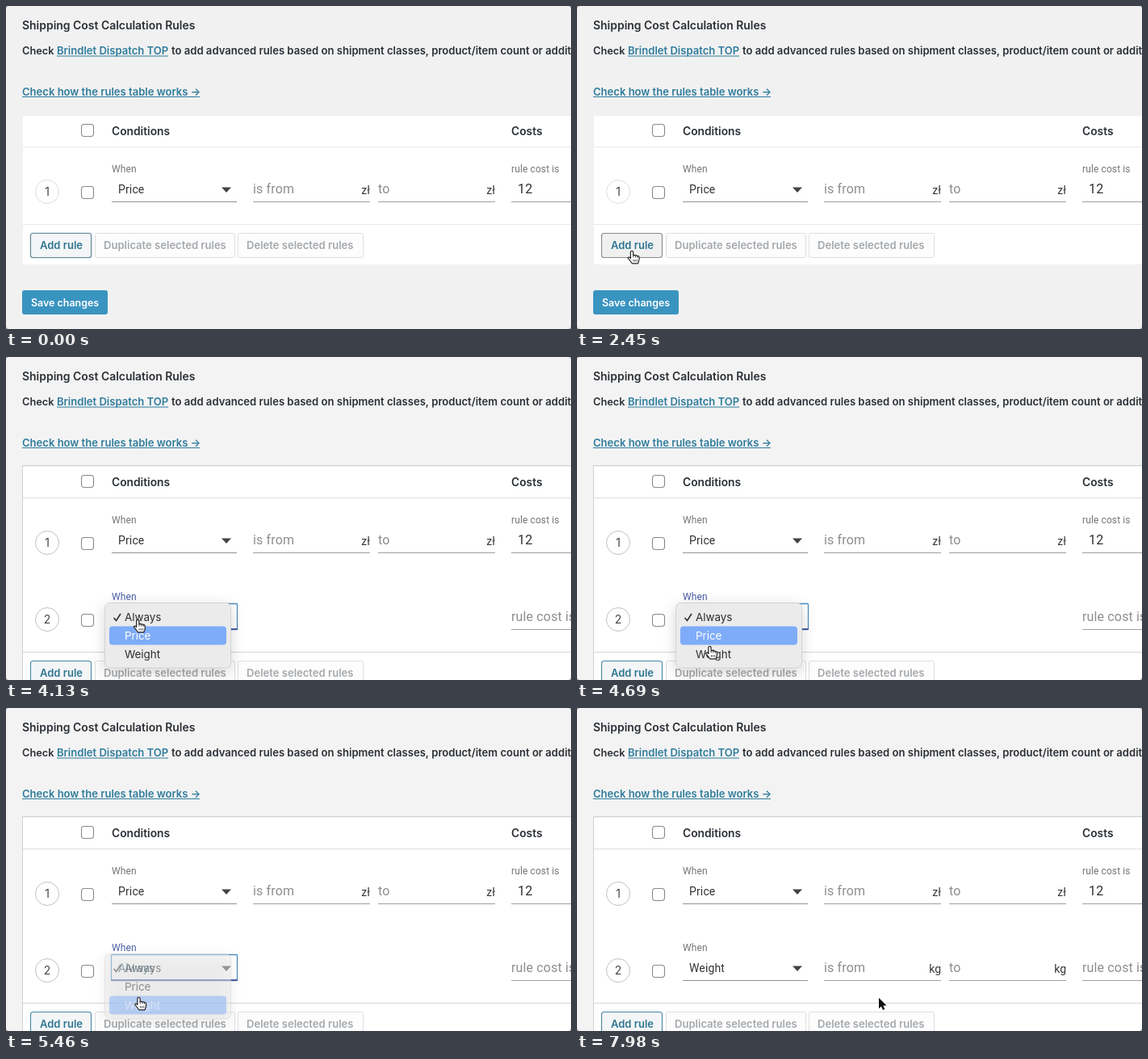
An HTML page with a canvas for the animation above (8 s loop, 700x400 px).

```html
<!DOCTYPE html>
<html lang="en">
<head>
<meta charset="utf-8">
<title>Shipping rules</title>
<style>
  html, body { margin: 0; width: 100%; height: 100%; overflow: hidden; background: #f2f2f2; }
  canvas { display: block; width: 700px; height: 400px; }
</style>
</head>
<body>
<canvas id="stage" width="700" height="400"></canvas>
<script>
const ctx = document.getElementById('stage').getContext('2d');
const LOOP = 8000;
const UI = 'Inter, "Liberation Sans", sans-serif';
const FIELD = 'Roboto, "Liberation Sans", sans-serif';
const INK = '#2b3036', LINK = '#2f7c9c', MUTED = '#a4a8ac', INDIGO = '#4a5ea6';

// Event times in ms
const T = {
  enter: 1050, hover: 1860, added: 2520, over: 3290, open: 3640,
  price: 4130, weight: 4760, fade: 5360, closed: 5560, blur: 7000
};
// Spans in which the mouse button is held
const CLICKS = [[2240, 2400], [3500, 3640], [5040, 5180], [6860, 7000]];
// Cursor moves: start, end, x, y
const MOVES = [
  [980, 1820, 68, 303], [3040, 3480, 163, 320], [3880, 4660, 164.5, 358],
  [6040, 6640, 262, 357], [7500, 7980, 374, 359]
];

const ease = p => p < 0.5 ? 4 * p ** 3 : 1 - (2 - 2 * p) ** 3 / 2;
const clamp = p => Math.max(0, Math.min(1, p));
const within = (t, a, b) => t >= a && t < b;

function text(str, x, y, font, color, { align = 'left', gap = 0 } = {}) {
  ctx.font = font;
  ctx.fillStyle = color;
  ctx.textAlign = align;
  ctx.letterSpacing = gap + 'px';
  ctx.fillText(str, x, y);
  ctx.letterSpacing = '0px';
}
const bold = (str, x, y, size, color = INK) => text(str, x, y, `600 ${size}px ${UI}`, color);
const field = (str, x, y, size, color) =>
  text(str, x, y, `${size}px ${FIELD}`, color, { gap: size * 0.0094 });
const unit = (str, x, y) => text(str, x, y, `14px ${FIELD}`, '#383838', { align: 'right' });

function rect(x, y, w, h, color) {
  ctx.fillStyle = color;
  ctx.fillRect(x, y, w, h);
}

function box(x, y, w, h, r, fill, stroke, line = 1) {
  ctx.beginPath();
  ctx.roundRect(x, y, w, h, r);
  if (fill) { ctx.fillStyle = fill; ctx.fill(); }
  if (stroke) { ctx.strokeStyle = stroke; ctx.lineWidth = line; ctx.stroke(); }
}

function circle(x, y, r, color, line) {
  ctx.beginPath();
  ctx.arc(x, y, r, 0, 7);
  ctx.strokeStyle = color;
  ctx.lineWidth = line;
  ctx.stroke();
}

function link(str, x, y, width) {
  bold(str, x, y, 13.05, LINK);
  rect(x, y + 1.5, width, 1, LINK);
}

const checkbox = (x, y) => box(x - 7.5, y - 7.5, 15, 15, 3.5, '#fff', '#85898e', 1.1);

function arrowDown(x, y) {
  ctx.beginPath();
  ctx.moveTo(x - 6, y);
  ctx.lineTo(x + 6, y);
  ctx.lineTo(x, y + 6.5);
  ctx.fillStyle = '#444';
  ctx.fill();
}

function header() {
  bold('Shipping Cost Calculation Rules', 20, 28.5, 13.95);
  bold('Check', 20, 60, 12.8);
  link('Brindlet Dispatch TOP', 63, 60, 138);
  bold('to add advanced rules based on shipment classes, product/item count or addit', 205, 60, 13.08);
  link('Check how the rules table works →', 20, 110.5, 220);
}

function table(added) {
  const foot = added ? 365 : 270, bottom = added ? 420 : 320;
  rect(21, 136, 680, bottom - 136, '#fff');
  if (added) {
    rect(20, 134, 680, 1, '#d0d2d4');
    rect(20, 134, 1, 266, '#d0d2d4');
  }
  rect(21, 174, 680, 1, added ? '#dedede' : '#ebebeb');
  rect(21, foot, 680, 1, added ? '#d6d6d6' : '#e8e8e8');
  checkbox(101, 154);
  bold('Conditions', 131, 160, 13.8);
  bold('Costs', 626, 160, 13.8);
}

function range(y, suffix) {
  for (const [x, label] of [[306, 'is from'], [461, 'to']]) {
    field(label, x, y + 5, 16, '#8d8d8d');
    unit(suffix, x + 145, y + 5.5);
    rect(x, y + 15, 145, 1, '#a0a0a0');
  }
}

function rowStart(n, y, ring) {
  circle(51, y + 3, 14.5, ring, 1);
  text(n, 51, y + 8, `14px ${UI}`, '#444', { align: 'center' });
  checkbox(101, y + 4);
}

function select(value, y, state = 'idle') {
  const focus = state === 'focus', over = state === 'over';
  field('When', 131, y - 21, 12, focus ? INDIGO : '#757575');
  if (focus) {
    box(130.5, y - 16.5, 156, 32, 1, '#fff', '#4b8fc4', 1.3);
    rect(130, y + 14, 157, 2, INDIGO);
  } else if (over) {
    rect(131, y + 14, 155, 2, '#222');
  } else {
    rect(131, y + 15, 155, 1, '#929292');
  }
  field(value, 139, y + 5, 14, focus ? '#36667c' : over ? '#3a8fc0' : '#333');
  arrowDown(273, y - 2.5);
}

function firstRow(added) {
  rowStart('1', 227, added ? '#bfc1c3' : '#dddddd');
  select('Price', 227);
  range(227, 'zł');
  field('rule cost is', 626, 206, 12, '#757575');
  field('12', 634, 232, 16, '#303030');
  rect(626, 242, 80, 1, '#a0a0a0');
}

function secondRow(t) {
  const state = within(t, T.over, T.open) ? 'over' : within(t, T.open, T.blur) ? 'focus' : 'idle';
  rowStart('2', 322, '#bfc1c3');
  select(t < T.closed ? 'Always' : 'Weight', 322, state);
  if (t >= T.closed) range(322, 'kg');
  field('rule cost is', 626, 327, 16, '#8d8d8d');
  rect(626, 337, 80, 1, '#a0a0a0');
}

function buttons(t, added) {
  const y = added ? 376 : 281;
  const hover = within(t, T.hover, T.added), ring = added && t < T.open;
  const edge = hover ? '#858b90' : added ? '#4388a8' : '#64879a';
  if (!added && !hover) box(29, y - 1, 79, 33, 4, '#e9eef1');
  box(30.5, y + 0.5, 75, 30, 3, hover ? '#f0f0f1' : '#f3f5f6', edge, ring ? 2 : 1.1);
  bold('Add rule', 42, y + 20, 13, '#2f7590');
  for (const [x, w, label] of [
    [110.5, 173, 'Duplicate selected rules'],
    [287.5, 155, 'Delete selected rules']
  ]) {
    box(x, y + 0.5, w, 30, 2, '#fdfdfd', '#dcdee0');
    bold(label, x + 10.5, y + 20, 13.05, MUTED);
  }
  if (!added) {
    box(20, 352, 106, 30, 3, '#3994c0');
    bold('Save changes', 31, 371.5, 12.45, '#fff');
  }
}

function popup(t) {
  if (!within(t, T.open, T.closed + 120)) return;
  const active = t < T.price ? 0 : t < T.weight ? 1 : 2;
  ctx.save();
  ctx.globalAlpha = 1 - clamp((t - T.fade) / 200);
  ctx.save();
  ctx.shadowColor = 'rgba(0,0,0,.17)';
  ctx.shadowBlur = 18;
  ctx.shadowOffsetY = 4;
  box(122.5, 304.5, 156, 80.5, 6, '#ebebeb');
  ctx.restore();
  box(122.5, 304.5, 156, 80.5, 6, null, '#cfcfcf', 0.8);
  ['Always', 'Price', 'Weight'].forEach((label, i) => {
    const y = 322 + i * 23, on = i === active;
    if (on) box(128, y - 11.5, 145, 23, 4, '#7eacf9');
    text(label, 147, y + 5, `13.4px ${UI}`, on ? '#fff' : '#2d2d2d');
    if (i) return;
    ctx.beginPath();
    ctx.moveTo(133.5, 323);
    ctx.lineTo(136.5, 326.5);
    ctx.lineTo(142, 318);
    ctx.strokeStyle = on ? '#fff' : '#2d2d2d';
    ctx.lineWidth = 1.6;
    ctx.stroke();
  });
  ctx.restore();
}

const ARROW = new Path2D('M0 0V13.2L3 10.4 5 15 7.3 14 5.3 9.5H9.6Z');
const HAND = new Path2D('M-1.6 1.4Q0-.9 1.6 1.4L1.7 6Q3 4.6 4.4 6.2 5.8 5.2 6.9 6.8 8.7 6.2 9 8V11Q8.6 13 7.6 15.8H.2Q-1.5 13-4.8 9.4-4.6 7.2-2.6 8.4L-1.6 9.4Z');
const KNUCKLES = new Path2D('M1.7 6V8.4M4.4 6.2V8.6M6.9 6.8V8.8M2 11V13.6M4.1 11V13.6M6.2 11V13.6');

function cursorAt(t) {
  let x = 13, y = 358;
  for (const [start, end, tx, ty] of MOVES) {
    const p = ease(clamp((t - start) / (end - start)));
    x += (tx - x) * p;
    y += (ty - y) * p;
  }
  return [x, y];
}

function cursor(t) {
  if (t < T.enter) return;
  const [x, y] = cursorAt(t);
  const onButton = t < T.added && x > 31 && y < 311;
  const hand = onButton || within(t, 3920, 6090);
  if (CLICKS.some(([a, b]) => within(t, a, b))) circle(x, y + 1, 21.5, '#1a1a1a', 1.5);
  ctx.save();
  ctx.translate(x, y);
  ctx.lineJoin = 'round';
  if (hand) {
    ctx.fillStyle = '#fff';
    ctx.strokeStyle = '#222';
    ctx.lineWidth = 1.2;
    ctx.fill(HAND);
    ctx.stroke(HAND);
    ctx.lineWidth = 0.8;
    ctx.stroke(KNUCKLES);
  } else {
    ctx.strokeStyle = '#fff';
    ctx.lineWidth = 2;
    ctx.stroke(ARROW);
    ctx.fillStyle = '#111';
    ctx.fill(ARROW);
  }
  ctx.restore();
}

function corners() {
  ctx.beginPath();
  ctx.rect(0, 0, 700, 400);
  ctx.roundRect(0, 0, 700, 400, 4);
  ctx.fillStyle = '#9a9a9a';
  ctx.fill('evenodd');
}

function draw(t) {
  const added = t >= T.added;
  rect(0, 0, 700, 400, added ? '#f3f3f3' : '#f1f1f1');
  header();
  table(added);
  firstRow(added);
  if (added) secondRow(t);
  buttons(t, added);
  popup(t);
  cursor(t);
  corners();
}

const begin = performance.now();
function tick() {
  draw((performance.now() - begin) % LOOP);
  requestAnimationFrame(tick);
}
tick();
</script>
</body>
</html>
```
